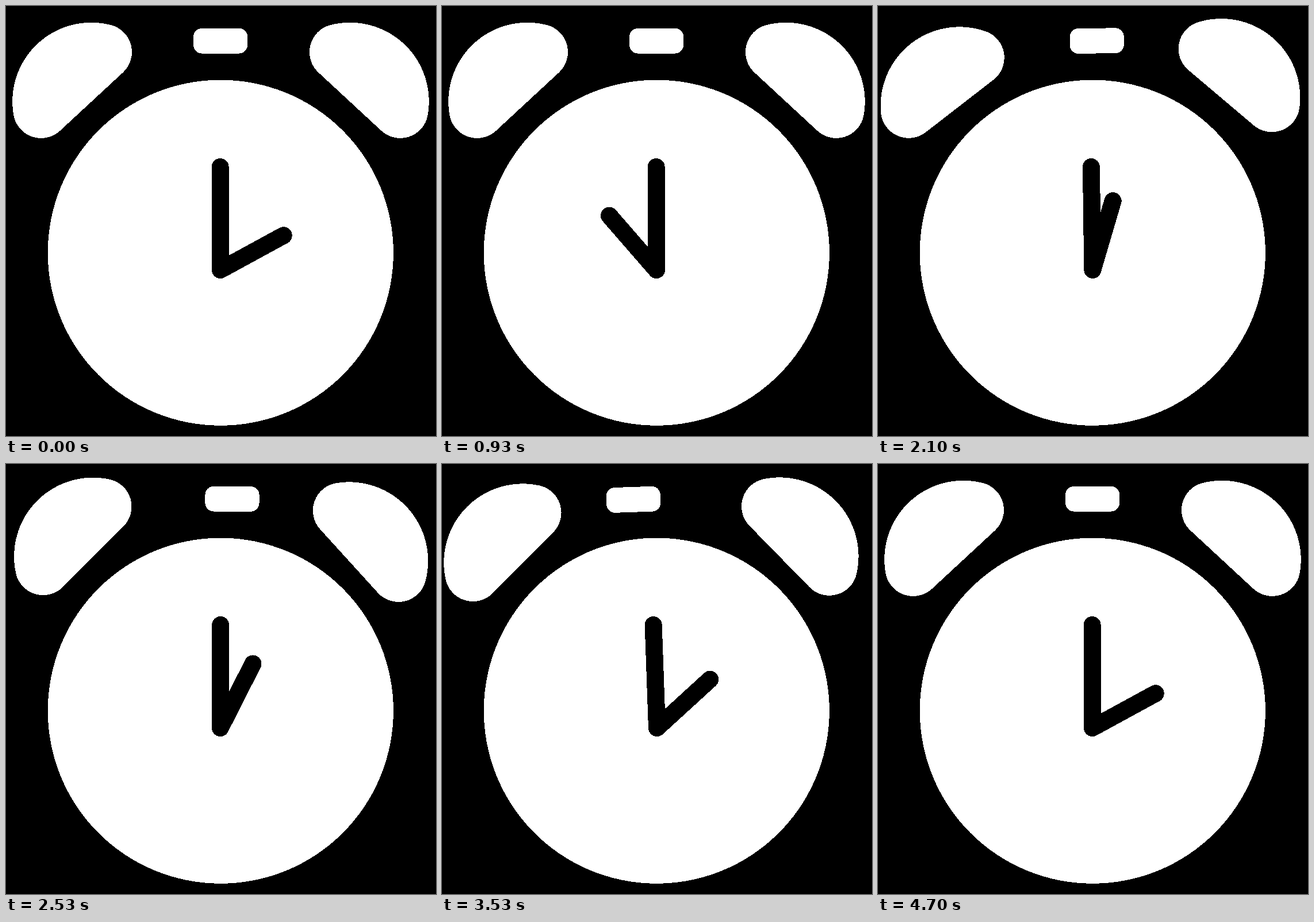
An HTML page that plays this animation: 748 by 748 pixels, repeating every 5510 ms.

```html
<!DOCTYPE html>
<html lang="en">
<head>
<meta charset="utf-8">
<title>Alarm clock</title>
<style>
  html, body { margin: 0; width: 100%; height: 100%; overflow: hidden; background: #000; }
  svg { display: block; width: 100vw; height: 100vh; }
</style>
</head>
<body>
<svg viewBox="0 0 748 748" shape-rendering="crispEdges">
  <defs>
    <path id="bell" transform="translate(115.75 130.75) rotate(-42.8)"
      d="M-74.65 48.5H74.65A48.5 48.5 0 0 0 115.4 -26.2A137.25 137.25 0 0 0 -115.4 -26.2A48.5 48.5 0 0 0 -74.65 48.5Z"/>
  </defs>
  <rect width="748" height="748"/>
  <g id="clock" fill="#fff">
    <use id="left" href="#bell"/>
    <g id="right"><use href="#bell" transform="translate(746.9 0) scale(-1 1)"/></g>
    <rect id="button" x="326" y="38.8" width="94.2" height="43.8" rx="15"/>
    <circle cx="373.3" cy="429.2" r="300.6"/>
    <g stroke="#000" stroke-width="30" stroke-linecap="round">
      <path d="M373 459L372.6 280"/>
      <path id="hour" d="M373 459V334"/>
    </g>
  </g>
</svg>
<script>
const LOOP = 5510, SHAKE_START = 1270, SHAKE_END = 4700;
const part = id => document.getElementById(id);
const [clock, left, right, button, hour] = ['clock', 'left', 'right', 'button', 'hour'].map(part);

// Hour hand: [time in ms, degrees]
const HOUR = [[0, 61.4], [600, 210], [930, 319], [1200, 347], [1670, 366],
  [2530, 386.7], [3130, 400.8], [3930, 416], [4700, 421.4]];

const slope = i => (HOUR[i + 1][1] - HOUR[i][1]) / (HOUR[i + 1][0] - HOUR[i][0]);

// Harmonic mean of neighbouring slopes keeps the curve monotone
function tangent(i) {
  if (i === 0 || i === HOUR.length - 1) return 0;
  const a = slope(i - 1), b = slope(i);
  return 2 * a * b / (a + b);
}

function hourAngle(t) {
  if (t >= SHAKE_END) return HOUR[0][1];
  const i = HOUR.findIndex(p => p[0] > t) - 1;
  const [t0, a0] = HOUR[i], [t1, a1] = HOUR[i + 1];
  const d = t1 - t0, s = (t - t0) / d, r = 1 - s;
  return a0 * (1 + 2 * s) * r * r + a1 * s * s * (3 - 2 * s)
    + d * s * r * (r * tangent(i) - s * tangent(i + 1));
}

// Phase in degrees, rate in degrees per ms
const wave = (t, phase, rate) => Math.sin((phase + rate * (t - 2530)) * Math.PI / 180);

// 30 frames a second, one frame in eighteen is held
function snap(ms) {
  let k = Math.floor((ms + 4) * 0.03);
  if (k % 18 === 1) k--;
  return Math.round(k * 10 / 3) * 10;
}

function draw(ms) {
  const t = snap(ms);
  const on = t >= SHAKE_START && t < SHAKE_END ? 1 : 0;
  const tilt = on * 1.9 * wave(t, 6, 2.06);
  const leftTurn = on * 6 * wave(t, 204, 1.06);
  const rightTurn = on * (1.5 + 4.2 * wave(t, 50, 1.08));
  const slide = on * 28 * wave(t, 137, 1.935);

  clock.setAttribute('transform', `rotate(${tilt} 373.3 429.2)`);
  left.setAttribute('transform', `translate(${on * 0.4} ${on * -1.5}) rotate(${leftTurn} 82 128)`);
  right.setAttribute('transform', `translate(${on * 0.6} ${on * -2.4}) rotate(${rightTurn} 546 132)`);
  button.setAttribute('transform', `translate(${slide} 0)`);
  hour.setAttribute('transform', `rotate(${hourAngle(t)} 373 459)`);
}

const start = performance.now();
function tick() {
  draw((performance.now() - start) % LOOP);
  requestAnimationFrame(tick);
}
tick();
</script>
</body>
</html>
```
